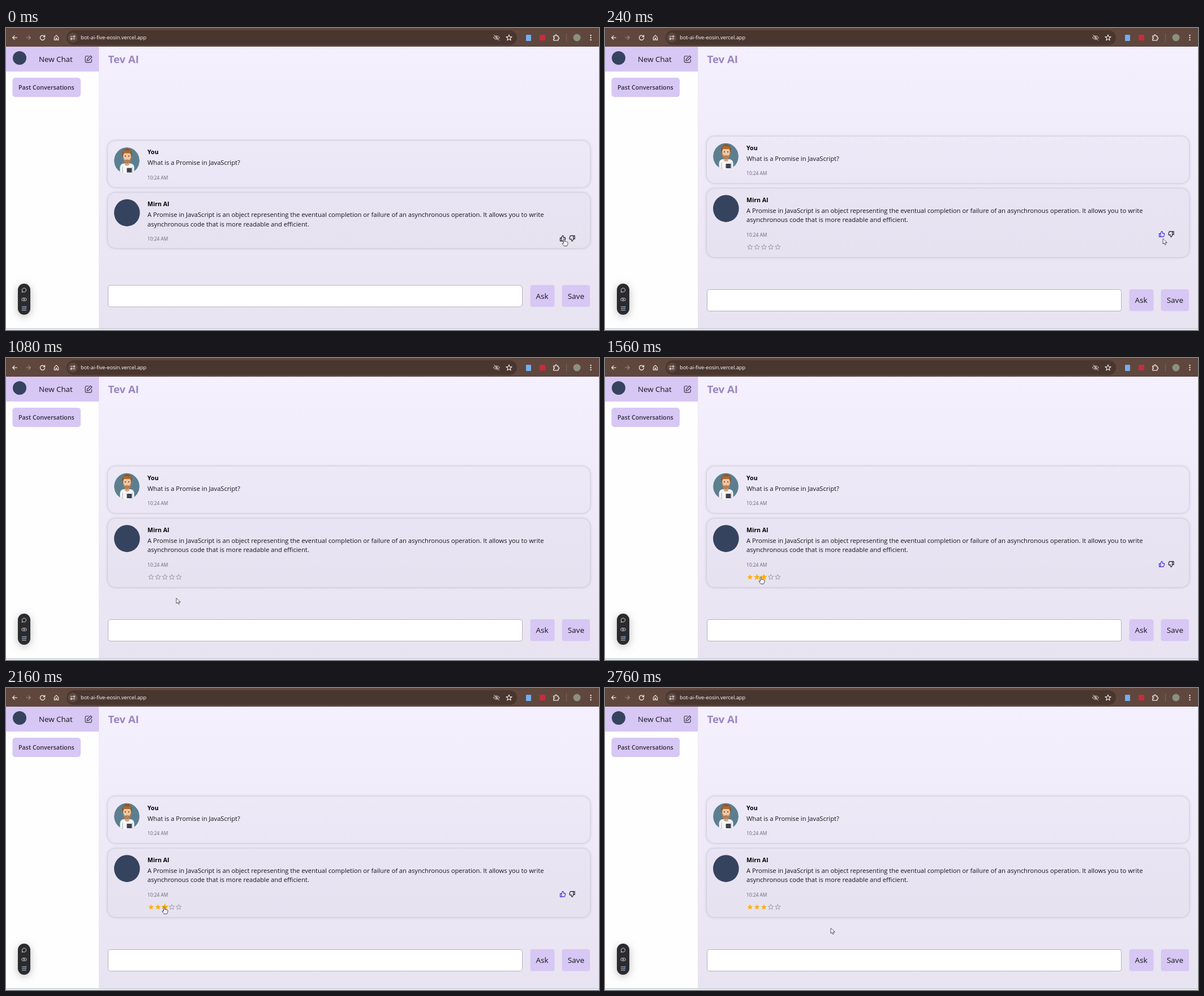
These frames come from a looping animation (1048 by 534 pixels, 2880 ms). An HTML page with a canvas:

```html
<!DOCTYPE html>
<html lang="en">
<head>
<meta charset="utf-8">
<title>Chat</title>
<style>
html, body { margin: 0; width: 100%; height: 100%; overflow: hidden; background: #fff; }
canvas { display: block; }
</style>
</head>
<body>
<canvas id="stage" width="1048" height="534"></canvas>
<script>
const ctx = document.getElementById('stage').getContext('2d');
const LOOP = 2880, STEP = 120, LIKED_AT = 240, RATED_AT = 1560;
const LILAC = '#d7c7f4', INK = '#15131c', PALE = '#f1e9e5', NAVY = '#36435f';

function box(x, y, w, h, r, fill, stroke) {
  ctx.beginPath();
  ctx.roundRect(x, y, w, h, r);
  if (fill) { ctx.fillStyle = fill; ctx.fill(); }
  if (stroke) { ctx.strokeStyle = stroke; ctx.lineWidth = 1; ctx.stroke(); }
}

function oval(x, y, rx, ry, fill) {
  ctx.beginPath();
  ctx.ellipse(x, y, rx, ry, 0, 0, Math.PI * 2);
  ctx.fillStyle = fill;
  ctx.fill();
}

function text(str, x, y, size, weight = 400, color = INK) {
  ctx.font = `${weight} ${size}px "Open Sans", "Noto Sans", sans-serif`;
  ctx.fillStyle = color;
  ctx.fillText(str, x, y);
}

// Icon paths live in a 24-unit square centred on x, y
function icon(d, x, y, size, color, line = 2, fill) {
  const k = size / 24, p = new Path2D(d);
  ctx.save();
  ctx.translate(x - size / 2, y - size / 2);
  ctx.scale(k, k);
  ctx.lineCap = ctx.lineJoin = 'round';
  if (fill) { ctx.fillStyle = fill; ctx.fill(p); }
  if (line) { ctx.strokeStyle = color; ctx.lineWidth = line; ctx.stroke(p); }
  ctx.restore();
}

const ICONS = {
  back: 'M21 12H3M11 4L3 12L11 20',
  next: 'M3 12H21M13 4L21 12L13 20',
  reload: 'M20 8A9 9 0 1 0 21 14M21 3V9H15',
  home: 'M4 11L12 3L20 11V21H14V14H10V21H4Z',
  tune: 'M3 7H11M21 7A3 3 0 1 1 15 7A3 3 0 1 1 21 7M13 17H21M9 17A3 3 0 1 1 3 17A3 3 0 1 1 9 17',
  eyeOff: 'M1 12Q12 -1 23 12Q12 25 1 12M15 12A3 3 0 1 1 9 12A3 3 0 1 1 15 12M3 2L21 22',
  eye: 'M7 5H17A7 7 0 0 1 17 19H7A7 7 0 0 1 7 5M15 12A3 3 0 1 1 9 12A3 3 0 1 1 15 12',
  puzzle: 'M3 6H9C8 0 16 0 15 6H20V11C25 10 25 18 20 17V22H3V16C8 17 8 10 3 11Z',
  edit: 'M12 3H5Q2 3 2 6V19Q2 22 5 22H18Q21 22 21 19V13M18 2L22 6L12 16L7 17L8 12Z',
  thumb: 'M7 10L11 1Q15 1 15 5V9H20Q23 9 22 12L20 20Q19.5 22 17 22H7ZM7 10H2V22H7',
  bubble: 'M8 20A9 9 0 1 0 4 16L3 21Z',
  arrow: 'M2 1V19L6.5 15L9.5 22L13 20.5L10 14H16Z',
  hand: 'M7 2Q9 0 11 2V10Q13 8 14.5 10Q17 8.5 18 11Q21 10 21 13V18L18 24H9L3 16Q2 13 7 15Z'
};

function star(x, y, r, fill, stroke, line = 0.8) {
  ctx.beginPath();
  for (let i = 0; i < 10; i++) {
    const a = i * Math.PI / 5 - Math.PI / 2, q = i % 2 ? r * 0.43 : r;
    ctx.lineTo(x + q * Math.cos(a), y + q * Math.sin(a));
  }
  ctx.closePath();
  ctx.lineJoin = 'round';
  if (fill) { ctx.fillStyle = fill; ctx.fill(); }
  if (stroke) { ctx.strokeStyle = stroke; ctx.lineWidth = line; ctx.stroke(); }
}

function browserBar() {
  box(0, 0, 1048, 33, 0, '#5f473e');
  box(107, 4, 796, 26, 13, '#49362f');
  oval(118, 17, 8.5, 8.5, '#5f4a42');
  icon(ICONS.back, 15.5, 17, 10, PALE, 3);
  icon(ICONS.next, 39.5, 17, 10, '#a08d86', 2.6);
  icon(ICONS.reload, 64.5, 17, 11, PALE, 2.8);
  icon(ICONS.home, 89, 17, 11, PALE, 2.4);
  icon(ICONS.tune, 118, 17, 10, PALE, 2.6);
  text('bot-ai-five-eosin.vercel.app', 132, 20.3, 9.25, 400, '#fff');
  icon(ICONS.eyeOff, 867, 17, 12, '#d9cdc8', 2);
  star(889, 17.3, 5.4, null, PALE, 1.1);
  box(919, 12, 9, 11, 1, '#74aef0');
  box(943, 12, 10, 10, 1, '#c92b3c');
  icon(ICONS.puzzle, 972, 17, 11.5, PALE, 2.6);
  box(990, 10, 1, 14, 0, '#7b655c');
  oval(1009, 17, 6.5, 6.5, '#8b9080');
  for (let i = -1; i < 2; i++) oval(1033.5, 17 + i * 4, 1.2, 1.2, PALE);
}

function sidebar() {
  box(0, 33, 164, 498, 0, '#fefeff');
  box(0, 33, 164, 44, 0, LILAC);
  oval(24, 53, 12, 12, NAVY);
  text('New Chat', 58, 60, 13.3);
  icon(ICONS.edit, 146, 55, 14, '#3b3448', 2);
  box(11.5, 88, 120.5, 34, 5, LILAC);
  text('Past Conversations', 22, 108.5, 10.7, 600, '#302a3b');

  ctx.save();
  ctx.shadowColor = 'rgba(0,0,0,.25)';
  ctx.shadowBlur = 14;
  ctx.shadowOffsetY = 3;
  box(21, 452, 22, 55, 11, '#2b2b2e');
  ctx.restore();
  icon(ICONS.bubble, 32, 463.5, 9.5, '#f2f2f2', 2.2);
  icon(ICONS.eye, 32, 480, 8.5, '#e2e2e2', 2.4);
  for (let i = 0; i < 3; i++) box(28, 492.5 + i * 3, 8, 1, 0, '#c9d3e4');
  oval(35, 493, 1.5, 1.5, '#3f8fe8');
}

function card(y, h) {
  ctx.save();
  ctx.shadowColor = 'rgba(60,50,80,.3)';
  ctx.shadowBlur = 5;
  const g = ctx.createLinearGradient(0, y, 0, y + h);
  g.addColorStop(0, y < 250 ? '#ede9f7' : '#e9e4f3');
  g.addColorStop(1, y < 250 ? '#eae6f5' : '#e7e2f0');
  box(180, y, 852, h, 14, g);
  ctx.restore();
}

function person(x, y) {
  ctx.save();
  ctx.translate(x, y);
  ctx.beginPath();
  ctx.ellipse(0, 0, 22.5, 23.5, 0, 0, Math.PI * 2);
  ctx.clip();
  oval(0, 0, 22.5, 23.5, '#5c7f90');
  box(-12, 5, 25, 26, 7, '#f6f6f8');
  box(-3.5, 0, 8, 9, 3, '#d9a57f');
  oval(0.5, -12, 9, 9.5, '#8f5527');
  oval(0.5, -5.5, 7.5, 10.5, '#b67d50');
  oval(0.5, -8, 6.8, 8.5, '#efc6a2');
  box(-6.5, -18, 14, 5, 2.5, '#a9692f');
  oval(-2.5, -8, 1, 1.1, '#3a2a22');
  oval(3.5, -8, 1, 1.1, '#3a2a22');
  box(-2.5, -1.5, 6, 1.3, 0.6, '#94583c');
  box(0, 13, 9, 8, 1, '#3d4250');
  box(-8, 11, 1, 14, 0, '#a4abb8');
  box(9, 11, 1, 14, 0, '#a4abb8');
  ctx.restore();
}

function message(y, name, lines) {
  text(name, 250, y + 23.5, 10.6, 700, '#000');
  lines.forEach((s, i) => text(s, 250, y + 42.5 + i * 16.5, 11.17));
  text('10:24 AM', 250, y + 51.5 + lines.length * 16.5, 8.35, 400, '#6b6776');
}

function button(label, x, y, w, tx) {
  box(x, y, w, 38.5, 4, LILAC);
  text(label, tx, y + 24.3, 13.5, 500);
}

const smooth = u => u * u * (3 - 2 * u);

// start, end, from, to, easing
const MOVES = [
  [240, 600, [986, 373], [926, 391], u => u * u],
  [600, 1080, [926, 391], [301, 425], u => 1 - (1 - u) ** 2],
  [1080, 1320, [301, 425], [256, 388], smooth],
  [1320, 1560, [256, 388], [275, 387], u => u],
  [1560, 2160, [275, 387], [279, 387], u => u],
  [2340, 2760, [279, 387], [399, 425], smooth]
];

function pointer(t) {
  let pos = MOVES[0][2];
  for (const [a, b, p, q, ease] of MOVES) {
    if (t < a) break;
    const k = ease(Math.min(1, (t - a) / (b - a)));
    pos = p.map((v, i) => v + (q[i] - v) * k);
  }
  return pos;
}

function drawPointer(x, y, hand) {
  if (hand) icon(ICONS.hand, x + 2, y + 6, 13, '#34343a', 1.7, '#fff');
  else icon(ICONS.arrow, x + 5, y + 5.5, 12, '#45454c', 1.8, '#fff');
}

function thumbs(y, liked) {
  icon(ICONS.thumb, 984, y, 11, liked ? '#3027d8' : INK, 2.4);
  ctx.save();
  ctx.translate(1000.5, y);
  ctx.rotate(Math.PI);
  icon(ICONS.thumb, 0, 0, 11, INK, 2.4);
  ctx.restore();
}

function rating(mx, hovered, score) {
  const count = hovered ? Math.ceil((mx - 250) / 12.3) : score;
  for (let i = 0; i < 5; i++) {
    const x = 256.3 + i * 12.25;
    const grow = hovered ? Math.max(0, 1 - Math.abs(x - mx) / 11) : 0;
    if (i < count) star(x, 387.5, 5.2 + 2 * grow, '#fbb004');
    else star(x, 387.5, 4.9, null, '#8f8b99');
  }
}

function draw(t) {
  const liked = t >= LIKED_AT;
  const [mx, my] = pointer(t);
  const overStars = liked && my < 394 && mx < 312;
  const top1 = liked ? 192 : 199.5, top2 = liked ? 284 : 291.5;
  const askY = liked ? 462 : 454.5;

  const bg = ctx.createLinearGradient(0, 33, 0, 531);
  bg.addColorStop(0, '#f4f0fd');
  bg.addColorStop(1, '#e7e3f0');
  box(0, 0, 1048, 534, 0, '#f7f8fb');
  box(164, 33, 884, 498, 0, bg);
  box(163.5, 33, 1, 498, 0, '#e4dff0');
  box(0, 531, 1048, 1.5, 0, '#c3cbd6');
  browserBar();
  sidebar();
  text('Tev AI', 180.5, 62.3, 18.6, 700, '#9b86c3');

  card(top1, 82);
  person(213.5, top1 + 35);
  message(top1, 'You', ['What is a Promise in JavaScript?']);

  card(top2, liked ? 121 : 97.5);
  oval(213.8, top2 + 35.2, 22.8, 24, NAVY);
  message(top2, 'Mirn AI', [
    'A Promise in JavaScript is an object representing the eventual completion or failure of an asynchronous operation. It allows you to write',
    'asynchronous code that is more readable and efficient.'
  ]);

  if (my < 405) thumbs(top2 + 80.5, liked);
  if (liked) rating(mx, overStars, t > RATED_AT ? 3 : 0);

  box(180.5, askY + 0.5, 732, 38, 4, '#fff', '#b5b1bd');
  button('Ask', 926.5, askY, 43, 936.5);
  button('Save', 982.5, askY, 49.5, 992.7);
  drawPointer(mx, my, !liked || overStars);
}

const start = performance.now();
function frame() {
  const t = (performance.now() - start) % LOOP;
  draw(Math.floor(t / STEP) * STEP);
  requestAnimationFrame(frame);
}
frame();
</script>
</body>
</html>
```
